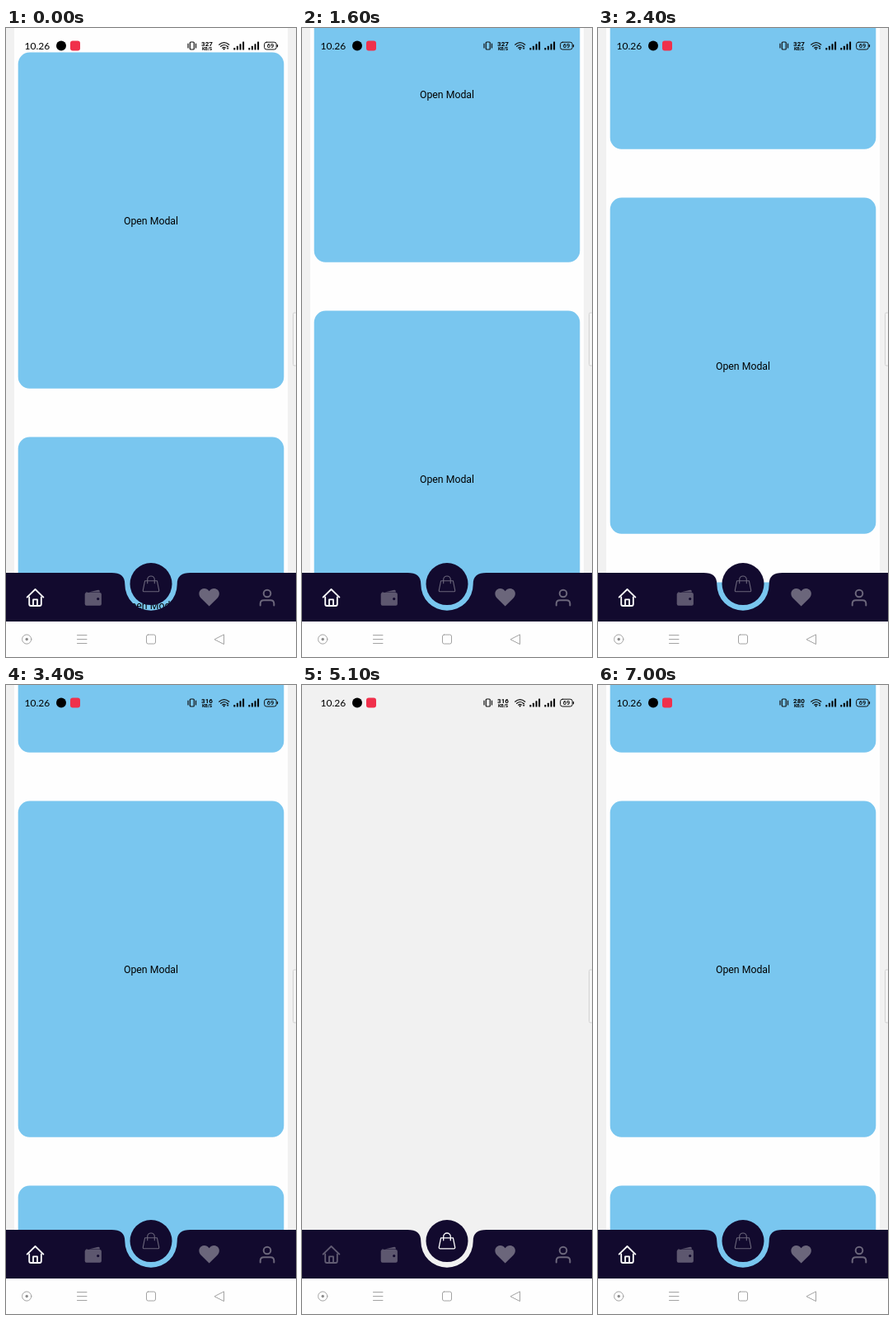
An HTML page that plays this animation: 352 px wide and 762 px high, repeating every 9100 ms.

```html
<!DOCTYPE html>
<html lang="en">
<head>
<meta charset="utf-8">
<title>Tab bar with scrolling cards</title>
<style>
  html, body { margin: 0; width: 100%; height: 100%; overflow: hidden; background: #f1f1f1; }
  svg { display: block; width: 100vw; height: 100vh; }
  .label { font: 12.3px Roboto, sans-serif; text-anchor: middle; }
  .clock { font: 12px Lato, sans-serif; }
  .tiny { font: 700 8px Roboto, sans-serif; text-anchor: middle; }
  .line { fill: none; stroke-linecap: round; stroke-linejoin: round; }
</style>
</head>
<body>
<svg viewBox="0 0 352 762" preserveAspectRatio="none">
  <rect width="352" height="762" fill="#f1f1f1"/>
  <g id="home">
    <rect x="10" width="332" height="719" fill="#fefefe"/>
    <g id="cards"></g>
  </g>

  <!-- status bar -->
  <text class="clock" x="22.6" y="26">10.26</text>
  <circle cx="67" cy="21.5" r="6"/>
  <rect x="78" y="15.5" width="12" height="12" rx="3" fill="#f0304b"/>
  <g class="line" stroke="#111" stroke-width="1.2">
    <rect x="223.3" y="17" width="5" height="9" rx="1"/>
    <path d="M221 19.2V24M230.5 19.2V24"/>
    <path d="M258.6 20.2Q264.7 14.9 270.8 20.2M260.6 22.3Q264.7 18.8 268.6 22.1M262.6 24.2Q264.6 22.6 266.4 24"/>
    <rect x="313.6" y="17.2" width="14.6" height="8.8" rx="2.6" stroke-width="1"/>
    <path d="M329.5 20.6V22.7"/>
  </g>
  <circle cx="264.6" cy="25.6" r="1"/>
  <path d="M267.6 23.3h3l-1.5-1.7zM267.6 24.3h3l-1.5 1.7z"/>
  <text id="speed" class="tiny" x="244" y="22"></text>
  <text class="tiny" x="244" y="27" style="font-size:5.4px">KB/S</text>
  <text class="tiny" x="321" y="24.3" style="font-size:7.4px;font-weight:500">69</text>
  <g id="signal"></g>

  <rect x="348.5" y="345" width="5" height="64" rx="1.5" fill="#f5f5f5" stroke="#d2d2d2"/>

  <!-- tab bar -->
  <path fill="#120a2e" d="M0 660H128C139 660 144.3 664 144.3 674A31.7 31.7 0 0 0 207.7 674C207.7 664 213 660 224 660H352V719H0Z"/>
  <circle cx="176" cy="673.6" r="25.5" fill="#120a2e"/>
  <g id="house" class="line" stroke-width="1.8">
    <path d="M25.6 689.6L35.5 680L45.4 689.6"/>
    <path d="M28.2 689.5V698Q28.2 700 30.2 700H40.8Q42.8 700 42.8 698V689.5"/>
    <path d="M33 700V692.4H38V700"/>
  </g>
  <g fill="#5d576f">
    <path d="M97 684.2L112 680.8Q113.8 680.6 113.8 682.4V683.4H97Z"/>
    <rect x="95.7" y="684" width="20.2" height="15.7" rx="2"/>
    <circle cx="111.7" cy="691.6" r="1.6" fill="#120a2e"/>
  </g>
  <path fill="#6b667b" d="M246.6 700.6L236.5 690.5C233.4 687.2 233.8 682.5 236.8 680.3C240 678 244 678.8 246.6 682.2C249.2 678.8 253.2 678 256.4 680.3C259.4 682.5 259.8 687.2 256.7 690.5Z"/>
  <g class="line" stroke="#6b667b" stroke-width="2">
    <circle cx="317" cy="685" r="4.3"/>
    <path d="M308.7 699.6V697.4Q308.7 693.2 313 693.2H321Q325.3 693.2 325.3 697.4V699.6"/>
  </g>
  <g id="bag" class="line">
    <path d="M168.6 669.8H183.4L185.7 681.2Q185.9 682.8 184.3 682.8H167.7Q166.1 682.8 166.3 681.2Z"/>
    <path d="M171.7 672.8V668.3A4.3 4.3 0 0 1 180.3 668.3V672.8"/>
  </g>

  <!-- system buttons -->
  <rect y="719" width="352" height="43" fill="#fefefe"/>
  <g class="line" stroke="#a3a3a3">
    <circle cx="25.2" cy="740.5" r="5.6"/>
    <path d="M86.5 735.5H98M86.5 740.5H98M86.5 745.5H98"/>
    <rect x="170.5" y="735" width="11" height="11" rx="2"/>
    <path d="M253.3 740.5L264.5 734.8V746.2Z"/>
  </g>
  <circle cx="25.2" cy="740.5" r="1.7" fill="#8c8c8c"/>
</svg>
<script>
  const LOOP = 9100, STEP = 100, PITCH = 466, TOP = 29.6;
  const OPEN = 4100, CLOSE = 6000;
  // [time, scroll offset] of the two swipes
  const SWIPE = [[1000, 0], [1300, 75], [1900, 231], [2000, 248], [2200, 264],
                 [2400, 290], [2600, 342], [2700, 355]];
  const $ = id => document.getElementById(id);

  $("cards").innerHTML = [0, 1, 2].map(i => {
    const y = TOP + i * PITCH;
    return `<rect x="14.7" y="${y}" width="322.6" height="407.2" rx="14" fill="#79c6ef"/>
      <text class="label" x="176" y="${y + 208.6}">Open Modal</text>`;
  }).join("");

  $("signal").innerHTML = [276.3, 294.3].map(x => [2.6, 4.8, 7.2, 10].map((h, i) =>
    `<rect x="${x + i * 3.6}" y="${26.5 - h}" width="2" height="${h}" rx=".5"/>`).join("")).join("");

  function scrollAt(t) {
    if (t <= SWIPE[0][0]) return 0;
    for (let i = 1; i < SWIPE.length; i++) {
      const [t0, y0] = SWIPE[i - 1], [t1, y1] = SWIPE[i];
      if (t <= t1) return y0 + (y1 - y0) * (t - t0) / (t1 - t0);
    }
    return SWIPE[SWIPE.length - 1][1];
  }

  function draw(time) {
    const t = Math.floor((time % LOOP) / STEP) * STEP;
    const bagOpen = t >= OPEN && t < CLOSE;
    $("home").style.display = bagOpen ? "none" : "";
    $("cards").setAttribute("transform", `translate(0 ${-scrollAt(t)})`);
    $("speed").textContent = t < 2900 ? 327 : t < 7000 ? 316 : 280;
    $("house").setAttribute("stroke", bagOpen ? "#625c73" : "#fff");
    $("bag").setAttribute("stroke", bagOpen ? "#fff" : "#6b667b");
    $("bag").setAttribute("stroke-width", bagOpen ? 1.3 : 1.1);
  }

  let start;
  function tick(now) {
    start ??= now;
    draw(now - start);
    requestAnimationFrame(tick);
  }
  draw(0);
  requestAnimationFrame(tick);
</script>
</body>
</html>
```
